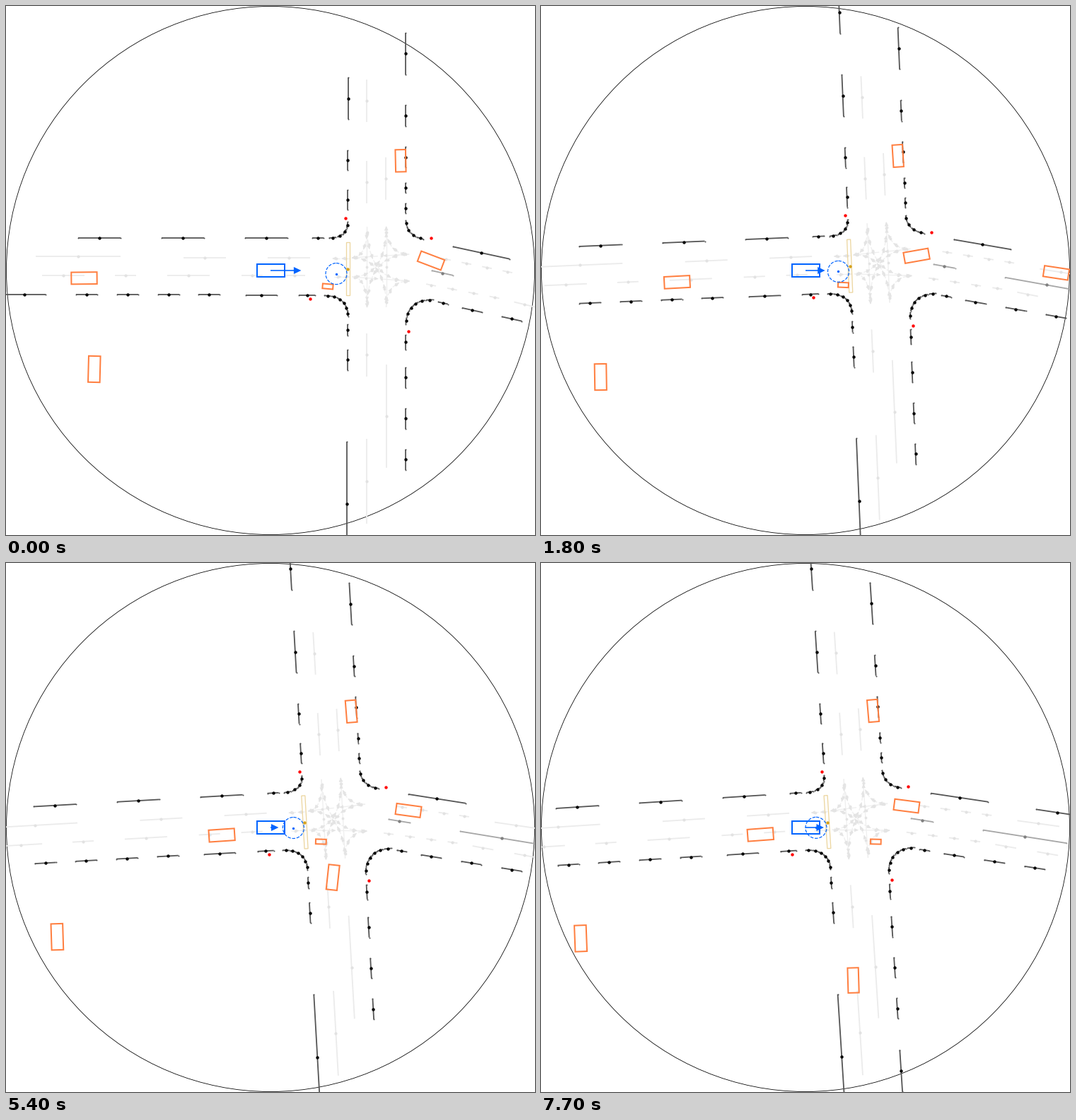
These frames come from a looping animation (748 by 748 pixels, 7.8 s). A matplotlib script:

```python
import numpy as np
import matplotlib.pyplot as plt
from matplotlib.animation import FuncAnimation
from matplotlib.collections import LineCollection, PolyCollection
from matplotlib.patches import Circle, Rectangle

SIZE, FRAMES, STEP = 748, 78, 100
MID = SIZE / 2
PX = 0.72  # points per pixel at 100 dpi
T = np.arange(FRAMES)
KEYS = [0, 18, 41, 64, 77]
PIVOT = np.array([463.1, 362.1])  # map point the ego pose is expressed at

BLUE, ORANGE, RED = "#0064ff", "#ff7f40", "#ff0000"


def curve(ts, ys):
    """Smooth curve through the keys, without overshoot, at every frame."""
    ts, ys = np.array(ts, float), np.array(ys, float)
    h = np.diff(ts)
    d = np.diff(ys) / h
    m = np.gradient(ys, ts, edge_order=2)
    lim = 3 * np.minimum(abs(d[:-1]), abs(d[1:])) * (d[:-1] * d[1:] > 0)
    m[1:-1] = np.clip(m[1:-1], -lim, lim)
    i = np.clip(np.searchsorted(ts, T, side="right") - 1, 0, len(h) - 1)
    u = (T - ts[i]) / h[i]
    return ((1 + 2 * u) * (1 - u) ** 2 * ys[i] + u * (1 - u) ** 2 * h[i] * m[i]
            + u * u * (3 - 2 * u) * ys[i + 1] + u * u * (u - 1) * h[i] * m[i + 1])


def smooth(u):
    u = np.clip(u, 0, 1)
    return u * u * (3 - 2 * u)


# The ego car brakes, waits and creeps on; its heading follows the distance driven
driven = curve([0, 7, 18, 29, 41, 55, 64, 77],
               [0, 21.6, 47.2, 59.3, 61.3, 61.6, 64.6, 79.1])
speed = np.gradient(driven)
heading = np.radians(3.67 * smooth(driven / 78))
pose = np.stack([PIVOT[0] - driven, PIVOT[1] - 4 * smooth(driven / 70)], 1)
arrow_len = 11 + 9.7 * speed


def to_view(p, f):
    c, s = np.cos(heading[f]), np.sin(heading[f])
    return (np.asarray(p) - PIVOT) @ np.array([[c, -s], [s, c]]) + pose[f]


def in_range(p):
    return np.hypot(*(p - MID).T) < MID


def unit(deg):
    a = np.radians(deg)
    return np.stack([np.cos(a), np.sin(a)], -1)


def box(center, w, h, deg):
    u, v = unit(deg) * w / 2, unit(deg + 90) * h / 2
    return np.array([center - u - v, center + u - v, center + u + v, center - u + v])


# Map pieces are rows of (x, y, half length, degrees)
def dashes(x, y, deg, half, n=1, gap=0):
    """n dashes in a line, gap apart from middle to middle."""
    u = unit(deg) * gap
    return [(x + k * u[0], y + k * u[1], half, deg) for k in range(n)]


def bend(start, corner, end, n, fill=0.8):
    """A rounded turn cut into n pieces."""
    a, b, c = map(np.array, (start, corner, end))

    def at(s):
        return (1 - s) ** 2 * a + 2 * s * (1 - s) * b + s * s * c

    s = (np.arange(n)[:, None] + 0.5) / n
    d = at(s + 0.5 / n) - at(s - 0.5 / n)
    return [(*m, np.hypot(*v) / 2 * fill, np.degrees(np.arctan2(v[1], v[0])))
            for m, v in zip(at(s), d)]


edges = (
    # north-west
    dashes(483.6, 12.9, 90, 29.5, 2, 117.6) + dashes(483.5, 218, 90, 14.3, 2, 56)
    + bend((483, 304), (483, 328), (455, 328), 4)
    + dashes(441, 327.8, 180, 8) + dashes(132, 327.8, 0, 30, 3, 118)
    # south-west
    + dashes(26, 408, 0, 30) + dashes(114, 408.4, 0, 15, 4, 57.8)
    + dashes(361, 409, 0, 22) + dashes(426, 409, 0, 11.5)
    + bend((449, 409.5), (483.5, 409.5), (483.5, 440), 6)
    + dashes(483.5, 457.5, 90, 8) + dashes(483.5, 500, 90, 14.5)
    + dashes(482.5, 704, 90, 88.5)
    # north-east
    + dashes(565.5, 67, 90, 29.5) + dashes(565.2, 155, 90, 14.7, 2, 58.5)
    + dashes(565.5, 257, 90, 7, 2, 28.5)
    + bend((565.5, 302), (566, 325), (592, 330), 4)
    + dashes(672, 349, 12.2, 41) + dashes(808.7, 379, 12.2, 30)
    # south-east
    + dashes(565.5, 475, 90, 10.5) + dashes(565.2, 525, 90, 14.5, 3, 58)
    + dashes(565, 729.3, 90, 29.5)
    + bend((565.5, 451), (566, 414), (605, 415.5), 6)
    + dashes(618, 420, 12.5, 7) + dashes(659, 430, 12.5, 14.5, 3, 57.7)
)
medians = dashes(617, 377.5, 12.6, 15.5) + dashes(760.7, 410, 12.6, 60)
lanes = (
    dashes(510.5, 134, 90, 30, 2, 114.5) + dashes(537.5, 244, 90, 30)
    + dashes(510.5, 493, 90, 30.5) + dashes(510.5, 672, 90, 60)
    + dashes(538, 580, 90, 73)
    + dashes(102.5, 354.3, 0, 60) + dashes(281, 355.7, 0, 30, 2, 119.5)
    + dashes(81, 381, 0, 30, 2, 177) + dashes(169, 381, 0, 15, 2, 179)
    + dashes(408, 381, 0, 15)
    + dashes(622, 358, 11.5, 7, 4, 29.6) + dashes(781, 392.8, 11.5, 30)
    + dashes(601, 394.5, 11, 7, 4, 30.4) + dashes(733, 422, 13.5, 15, 2, 60)
)

# Crossing: each arm has an entry and an exit, joined to every other arm
ARMS = {"W": ((488, 383), (488, 356)), "E": ((572, 351), (572, 389)),
        "N": ((510.5, 310), (537.7, 310)), "S": ((537.7, 428), (510.5, 428))}


def link(a, b):
    start, end = ARMS[a][0], ARMS[b][1]
    if a + b in "NSN":
        return bend(start, np.mean([start, end], 0), end, 1)
    if a + b in "WEW":
        return bend(start, np.mean([start, end], 0), end, 2)
    corner = (start[0], end[1]) if a in "NS" else (end[0], start[1])
    return bend(start, corner, end, round(np.hypot(*np.subtract(end, start)) / 13))


turns = sum((link(a, b) for a in ARMS for b in ARMS if a != b), [])
turns += dashes(480, 357, 180, 5, 2, 13) + dashes(469, 383, 0, 5, 2, 11)

fig = plt.figure(figsize=(SIZE / 100, SIZE / 100), dpi=100, facecolor="white")
ax = fig.add_axes([0, 0, 1, 1])
ax.set(xlim=(0, SIZE), ylim=(SIZE, 0))
ax.axis("off")


def dots(color, r, z):
    return ax.plot([], [], "o", color=color, ms=2 * r * PX, mew=0, zorder=z)[0]


def outlines(color, width, z):
    polys = PolyCollection([], facecolors="none", edgecolors=color,
                           linewidths=width * PX, joinstyle="miter", zorder=z)
    return ax.add_collection(polys)


class Layer:
    """Line pieces with a dot in the middle, shown when the dot is in range."""

    def __init__(self, segs, line, dot, r, lw, z, tips=None, heads=False):
        x, y, half, deg = np.array(segs, float).T
        self.mid = np.stack([x, y], 1)
        u = unit(deg)
        reach = u * half[:, None]
        self.ends = np.stack([self.mid - reach, self.mid + reach], 1)
        self.lines = ax.add_collection(LineCollection(
            [], colors=line, linewidths=lw * PX, capstyle="butt", zorder=z))
        self.dots = dots(dot, r, z + 0.2)
        self.tips = dots(line, tips, z + 0.1) if tips else None
        self.heads = None
        if heads:
            n = np.stack([-u[:, 1], u[:, 0]], 1)
            tip = self.mid + reach + u
            self.tri = np.stack([tip, tip - 6 * u + 2.6 * n, tip - 6 * u - 2.6 * n], 1)
            self.heads = ax.add_collection(PolyCollection(
                [], facecolors=dot, edgecolors="none", zorder=z))

    def update(self, f):
        mid = to_view(self.mid, f)
        seen = in_range(mid)
        ends = to_view(self.ends, f)[seen]
        self.lines.set_segments(ends)
        self.dots.set_data(*mid[seen].T)
        if self.tips:
            self.tips.set_data(*ends.reshape(-1, 2).T)
        if self.heads:
            self.heads.set_verts(to_view(self.tri, f)[seen])


class Agent:
    """A box on the map; without a fixed angle it faces the way it moves."""

    def __init__(self, w, h, x, y, deg=None):
        self.size = w, h
        self.path = np.stack(np.broadcast_arrays(x, y, T), 1)[:, :2]
        if deg is None:
            vx, vy = np.gradient(self.path, axis=0).T
            deg = np.degrees(np.arctan2(vy, vx))
        self.deg = np.broadcast_to(deg, FRAMES)

    def corners(self, f):
        return to_view(box(self.path[f], *self.size, self.deg[f]), f)


layers = [
    Layer(lanes, "#ebebeb", "#e2e2e2", 2.1, 1.8, 1),
    Layer(turns, "#efefef", "#e4e4e4", 1.9, 1.3, 1, heads=True),
    Layer(medians, "#a6a6a6", "#808080", 2.2, 1.8, 2, tips=1),
    Layer(edges, "#555555", "black", 2.2, 1.8, 3, tips=1),
]

follow_x = curve(KEYS, [110.5, 238.5, 342.5, 374.7, 387.9])
walk_x = curve(KEYS, [455, 473.1, 488.7, 521.5, 549.9])
oncoming_x = curve(KEYS, [882, 774.6, 662.8, 614.7, 596.7])
TURN_KEYS = [0, 18, 29, 41, 64, 77]
turn_x = curve(TURN_KEYS, [601, 578.4, 558.5, 534.5, 511.5, 505.7])
turn_y = curve(TURN_KEYS, [360, 361.1, 369.9, 396.2, 509, 597.3])

agents = [
    Agent(36.3, 16.8, follow_x, 384.8 - 0.006 * (follow_x - 110.5), -0.6),
    Agent(14.8, 6.8, walk_x, 396.5 + 0.076 * (walk_x - 455), 5),
    Agent(35.3, 15.3, turn_x, turn_y),
    Agent(35.3, 15.3, oncoming_x, 356.1 + 0.21 * (oncoming_x - 596.7), 11),
    Agent(14.5, 31.3, 558, 218.8, -1.2),
    Agent(16.6, 37, 124.8, 513.5, 1.5),
]

ax.add_patch(Circle((MID, MID), MID - 0.5, fill=False, ec="black", lw=0.8 * PX, zorder=0))

stop_poly = box(np.array([483.5, 371.5]), 5, 75, 0)
stop_line = outlines("#ecd6a0", 1.3, 4)
stop_dot = dots("#d6a21c", 2.2, 5)
boxes = outlines(ORANGE, 2, 6)
signals = dots(RED, 2.2, 5)
SIGNALS = [(479.8, 300), (600.8, 328.4), (430.5, 413.6), (569.4, 459.5)]

goal = ax.add_patch(Circle((0, 0), 15, fill=False, ec=BLUE, lw=1.2 * PX,
                           ls=(0, (3.7, 1.6)), zorder=7))
goal_dot = dots(BLUE, 1.7, 7)

ax.add_patch(Rectangle((354.7, 365.2), 39, 18, fill=False, ec=BLUE,
                       lw=2 * PX, joinstyle="miter", zorder=8))
shaft, = ax.plot([], [], color=BLUE, lw=1.6 * PX, solid_capstyle="butt", zorder=9)
head = ax.add_collection(PolyCollection([], facecolors=BLUE, edgecolors="none", zorder=9))


def draw(f):
    for layer in layers:
        layer.update(f)
    shapes = [a.corners(f) for a in agents]
    boxes.set_verts([s for s in shapes if in_range(s.mean(0))])
    stop_line.set_verts([to_view(stop_poly, f)])
    stop_dot.set_data(*to_view([(483.5, 372)], f).T)
    signals.set_data(*to_view(SIGNALS, f).T)
    goal.center = to_view((467, 378.6), f)
    goal_dot.set_data(*np.reshape(goal.center, (2, 1)))
    tip = MID + arrow_len[f]
    shaft.set_data([MID, tip - 5], [MID, MID])
    head.set_verts([[(tip, MID), (tip - 10.5, MID - 5), (tip - 10.5, MID + 5)]])
    return []


anim = FuncAnimation(fig, draw, frames=FRAMES, interval=STEP, repeat=True,
                     repeat_delay=0, init_func=lambda: draw(0))
plt.show()
```
